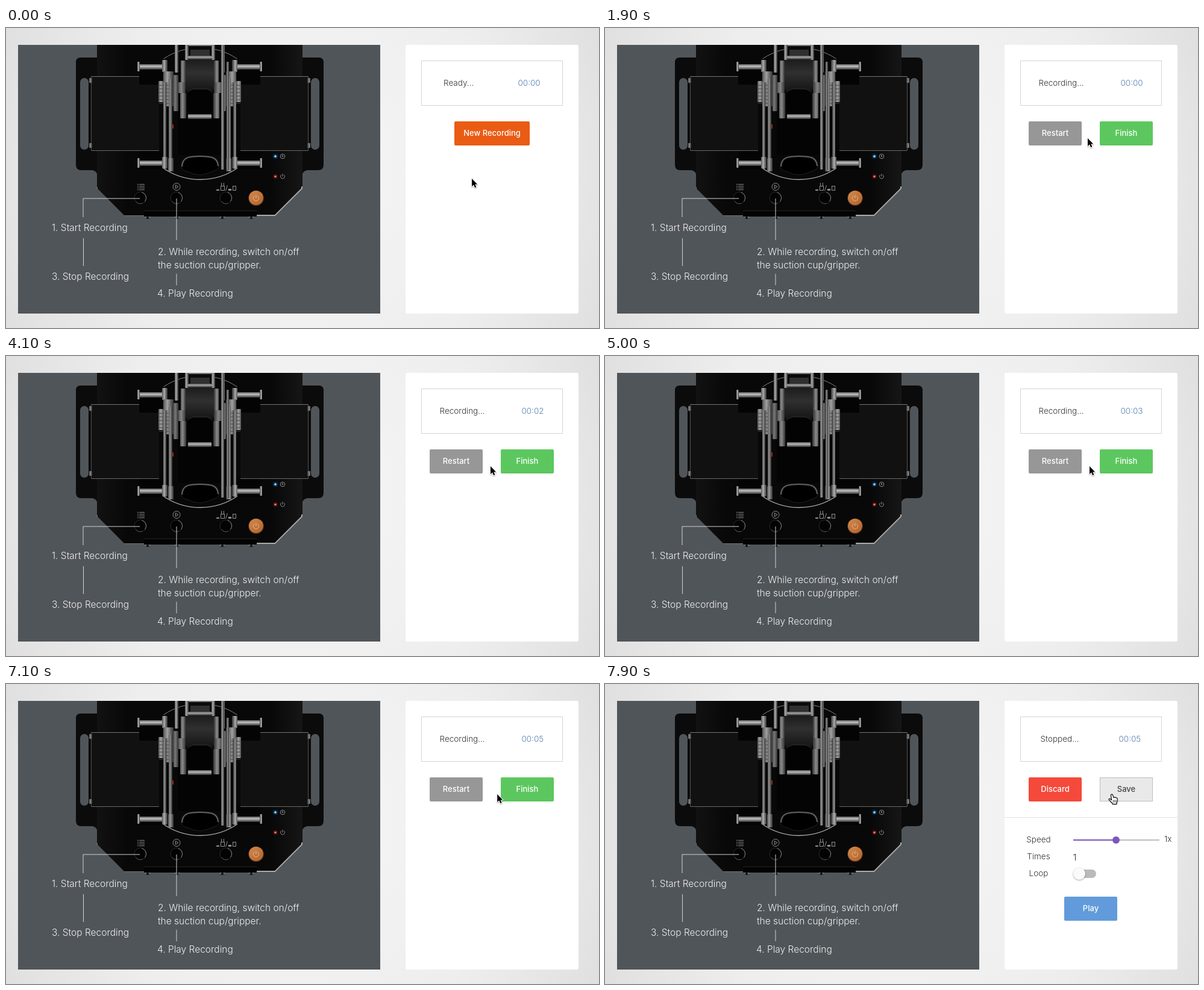
These frames come from a looping animation (984x498 px, 8 s). An HTML page with a canvas:

```html
<!DOCTYPE html>
<html lang="en">
<head>
<meta charset="utf-8">
<title>Recording panel</title>
<style>
html, body { margin: 0; width: 100%; height: 100%; overflow: hidden; background: #e9e9e9; }
canvas { display: block; }
</style>
</head>
<body>
<canvas id="stage" width="984" height="498"></canvas>
<script>
const W = 984, H = 498, LOOP = 8000;
const REC_AT = 1900, STOP_AT = 7600, COUNT_FROM = 1870;
const AXIS = 321.5;
const screen = document.getElementById('stage').getContext('2d');
const scene = document.createElement('canvas');
scene.width = W;
scene.height = H;
let c = scene.getContext('2d');

function box(color, x, y, w, h, r = 0) {
  c.fillStyle = color;
  c.beginPath();
  c.roundRect(x, y, w, h, r);
  c.fill();
}
function line(color, width, ...p) {
  c.strokeStyle = color;
  c.lineWidth = width;
  c.beginPath();
  for (let i = 0; i < p.length; i += 2) c.lineTo(p[i], p[i + 1]);
  c.stroke();
}
function disc(color, x, y, r) {
  c.fillStyle = color;
  c.beginPath();
  c.arc(x, y, r, 0, 7);
  c.fill();
}
function ring(color, width, x, y, r, a = 0, b = Math.PI * 2) {
  c.strokeStyle = color;
  c.lineWidth = width;
  c.beginPath();
  c.arc(x, y, r, a, b);
  c.stroke();
}
function shape(color, ...p) {
  c.fillStyle = color;
  c.beginPath();
  for (let i = 0; i < p.length; i += 2) c.lineTo(p[i], p[i + 1]);
  c.fill();
}
// Shaded cylinder; lies flat when wider than tall
function metal(x, y, w, h, hi = '#a8a8a8') {
  const g = w > h ? c.createLinearGradient(0, y, 0, y + h) : c.createLinearGradient(x, 0, x + w, 0);
  g.addColorStop(0, '#555');
  g.addColorStop(.4, hi);
  g.addColorStop(1, '#333');
  box(g, x, y, w, h, 1);
}
function text(s, x, y, size, color, weight = 400, align = 'left') {
  c.font = `${weight} ${size}px Inter, "Open Sans", sans-serif`;
  c.textAlign = align;
  c.fillStyle = color;
  c.fillText(s, x, y);
}
function power(color, x, y, r) {
  ring(color, 1, x, y, r, -1, Math.PI + 1);
  line(color, 1, x, y - r - 1, x, y);
}
function bothSides(draw) {
  draw();
  c.save();
  c.translate(AXIS * 2, 0);
  c.scale(-1, 1);
  draw();
  c.restore();
}

function flange() {
  c.fillStyle = '#0b0b0b';
  c.beginPath();
  c.moveTo(152, 49);
  c.lineTo(124, 49);
  c.quadraticCurveTo(116, 49, 116, 57);
  c.lineTo(116, 227);
  c.quadraticCurveTo(116, 236, 125, 236);
  c.lineTo(143, 236);
  c.quadraticCurveTo(151, 237, 152, 246);
  c.fill();
  box('#50555a', 123, 83, 14, 119, 7);
}
function plate() {
  box('#111', 141, 80, 113, 124);
  line('#77746f', 1, 254, 80.5, 141.5, 80.5);
  line('#55534f', 1, 141.5, 81, 141.5, 203);
  line('#6b6863', 1, 141.5, 203.5, 254, 203.5);
  for (const y of [87, 195]) metal(138, y - 4, 5, 8, '#888');
}
function linkage() {
  box('#040404', 221, 65, 38, 29, 2);
  box('#040404', 221, 204, 38, 30, 2);
  box('#111', 230, 94, 24, 109);
  for (const y of [64, 224]) {
    metal(220, y - 4, 46, 9, '#c2c2c2');
    metal(218, y - 8, 4, 16, '#b8b8b8');
  }
  metal(259, 53, 9, 20, '#aaa');
  metal(253, 88, 10, 35, '#a5a5a5');
  metal(261, 72, 17, 18, '#a0a0a0');
  metal(264, 90, 14, 40, '#8f8f8f');
  for (let y = 95; y < 128; y += 6) line('#444', 1, 254, y, 278, y);
  metal(278, 78, 8, 60, '#777');
  metal(286, 90, 12, 18, '#858585');
  metal(289, 108, 10, 42, '#8c8c8c');
  metal(290, 54, 8, 36, '#8c8c8c');
  metal(280, 28, 6, 46, '#aaa');
  box('#050505', 266, 130, 4, 90);
  metal(261, 90, 5, 144, '#929292');
  metal(270, 84, 6, 152, '#8b8b8b');
  metal(259, 214, 9, 19, '#b0b0b0');
  metal(269, 216, 9, 22, '#999');
}
function rightRods() {
  metal(357, 28, 5, 207, '#9a9a9a');
  metal(366, 56, 4, 180, '#858585');
}

function tower() {
  const g = c.createLinearGradient(0, 50, 0, 104);
  g.addColorStop(0, '#1a1a1a');
  g.addColorStop(.45, '#303030');
  g.addColorStop(1, '#161616');
  box('#0a0a0a', 299, 50, 45, 100, 3);
  box(g, 298, 52, 47, 52, 4);
  box('#030303', 301, 102, 41, 42, 10);
  line('#2b2b2b', 1, 300, 106, 311, 101, 333, 101, 343, 106);
  metal(302, 143, 39, 8, '#bcbcbc');
  box('#0a0a0a', 298, 28, 47, 24);
  metal(297, 28, 6, 25, '#aaa');
  metal(341, 28, 6, 25, '#aaa');
  box('#777', 303, 28, 38, 2);
  box('#303030', 306, 36, 32, 11);
  metal(301, 46, 42, 6, '#a5a5a5');
}

function handle() {
  c.fillStyle = '#000';
  c.beginPath();
  c.moveTo(291, 231);
  c.bezierCurveTo(290, 215, 302, 212, 322, 212);
  c.bezierCurveTo(342, 212, 354, 215, 353, 231);
  c.bezierCurveTo(350, 238, 342, 237, 335, 241);
  c.bezierCurveTo(326, 245, 313, 244, 306, 240);
  c.bezierCurveTo(299, 237, 293, 238, 291, 231);
  c.fill();
  c.strokeStyle = '#222';
  c.lineWidth = 1;
  c.stroke();
  c.strokeStyle = '#606060';
  c.lineWidth = 2.2;
  c.beginPath();
  c.moveTo(292, 230);
  c.bezierCurveTo(293, 215, 302, 213, 322, 213);
  c.bezierCurveTo(342, 213, 351, 215, 352, 229);
  c.stroke();
}

function icons() {
  const ink = '#8d8d8d';
  for (let y = 259.5; y < 271; y += 3) {
    box(ink, 218, y - .5, 2, 1);
    line(ink, 1, 221, y, 230, y);
  }
  ring(ink, 1, 283, 263.5, 6);
  line(ink, 1, 281.5, 260.5, 281.5, 266.5, 286, 263.5, 281.5, 260.5);
  box(ink, 349, 268, 5, 2);
  c.strokeStyle = ink;
  c.lineWidth = 1;
  c.strokeRect(356.5, 262.5, 6, 7);
  line(ink, 1, 357.5, 262, 357.5, 257);
  line(ink, 1, 361.5, 262, 361.5, 257);
  line(ink, 1, 364.5, 270, 367.5, 261);
  box(ink, 369, 267, 5, 3);
  c.strokeRect(376.5, 262.5, 5, 7);
  ring(ink, 1, 459, 213, 3.8);
  disc(ink, 459, 212.5, 1.2);
  power(ink, 459, 246.5, 3.5);
}

function led(core, glow, y) {
  const g = c.createRadialGradient(447, y, 1, 447, y, 6);
  g.addColorStop(0, glow);
  g.addColorStop(1, 'rgba(0,0,0,0)');
  c.fillStyle = g;
  c.fillRect(441, y - 6, 12, 12);
  disc(core, 447, y, 1.6);
}

function controls() {
  for (const x of [223, 283, 365]) {
    disc('#030303', x, 282, 11);
    ring('#2d2d2d', 1, x, 282, 10);
    ring('#858585', 1, x, 282, 9.5, -1.3, .7);
    ring('#555', 1, x, 282, 9.5, 1.2, 2.5);
  }
  disc('#40200f', 415, 282.5, 13);
  const g = c.createLinearGradient(405, 272, 424, 293);
  g.addColorStop(0, '#d08649');
  g.addColorStop(1, '#b3652f');
  disc(g, 415, 282, 12);
  power('#e5b894', 415, 282.5, 4.5);
  led('#aee2ff', '#1682d9', 213);
  led('#ff8371', '#a62018', 246.5);
}

function device() {
  c.save();
  c.beginPath();
  c.rect(20, 28, 601, 446);
  c.clip();
  bothSides(flange);
  const body = c.createLinearGradient(150, 0, 492, 0);
  body.addColorStop(0, '#121212');
  body.addColorStop(.15, '#080808');
  body.addColorStop(.85, '#080808');
  body.addColorStop(1, '#161616');
  shape(body, 151, 20, 492, 20, 492, 267, 447, 312, 196, 312, 151, 267);
  line('#777', 1, 151.5, 264, 151.5, 267, 196, 311.5, 230, 311.5);
  line('#aaa', 2, 415, 311, 446.5, 311, 491, 266.5, 491, 263);
  for (const x of [235, 284, 359, 407]) {
    metal(x - 5, 312, 10, 5, '#777');
    disc('#111', x, 315, 2);
  }
  box('#020202', 229, 304, 187, 9);
  line('#222', 1, 229, 303.5, 416, 303.5);
  bothSides(plate);
  ring('#858585', 1, AXIS + 1, 142, 109.5, -2.16, -.98);
  ring('#aaa', 1.3, AXIS + 1, 142, 109.5, .95, 2.19);
  box('#040404', 285, 95, 73, 116);
  tower();
  bothSides(linkage);
  rightRods();
  box('#9c211a', 276, 160, 2, 7);
  handle();
  icons();
  controls();
  c.restore();
}

function notes() {
  const ink = '#d2d3d4';
  line(ink, 1, 222, 283, 128, 283, 128, 314);
  line(ink, 1, 128.5, 349, 128.5, 395);
  line(ink, 1, 283, 283, 283, 352);
  line(ink, 1, 283, 408, 283, 427);
  const note = (s, x, y) => text(s, x, y, 15.5, '#f0f0f0', 300);
  note('1. Start Recording', 76, 336.5);
  note('3. Stop Recording', 76, 418);
  note('2. While recording, switch on/off', 252, 377);
  note('the suction cup/gripper.', 252, 399);
  note('4. Play Recording', 251, 445.5);
}

function buildScene() {
  const g = c.createRadialGradient(492, 230, 80, 492, 249, 570);
  g.addColorStop(0, '#f4f4f4');
  g.addColorStop(.55, '#eee');
  g.addColorStop(1, '#dedede');
  box(g, 0, 0, W, H);
  box('#505559', 20, 28, 601, 446);
  device();
  notes();
  box('#fff', 663, 28, 287, 446, 3);
  c.strokeStyle = '#d5d5d5';
  c.lineWidth = 1;
  c.strokeRect(689.5, 54.5, 234, 74);
}

const clamp = v => Math.max(0, Math.min(1, v));
const ease = v => v * v * (3 - 2 * v);
const path = [
  [0, 773, 250], [150, 773, 250], [900, 799, 190], [1100, 799, 190], [1750, 801, 183],
  [2300, 801, 183], [2900, 804, 183], [6900, 804, 183], [7450, 841, 183], [LOOP, 841, 183]
];
function pointer(t) {
  const i = path.findIndex((p, n) => n && t <= p[0]);
  const [a, ax, ay] = path[i - 1], [b, bx, by] = path[i];
  const k = ease((t - a) / (b - a));
  return [ax + (bx - ax) * k, ay + (by - ay) * k];
}
function mix(a, b, k) {
  return `rgb(${a.map((v, i) => Math.round(v + (b[i] - v) * k))})`;
}

function button(label, color, x, y, w = 88, ink = '#fff') {
  box(color, x, y, w, 40, 2);
  text(label, x + w / 2, y + 24, 13, ink, 500, 'center');
}
function status(label, x, time, tx) {
  text(label, x, 95.5, 13.5, '#333', 300);
  text(time, tx, 95.5, 13.5, '#5480ad', 300);
}

function settings() {
  line('#e3e3e3', 1, 663, 221.5, 950, 221.5);
  const label = (s, y) => text(s, 719.5, y, 13.5, '#333', 300, 'center');
  label('Speed', 263);
  label('Times', 291);
  label('Loop', 319);
  box('#bdbdbd', 848, 258, 72, 2);
  box('#7b57bd', 777, 258, 71, 2);
  disc('#7b57bd', 848, 259, 6);
  text('1x', 928, 262, 13.5, '#333', 300);
  text('1', 776.5, 292.5, 15, '#333', 300);
  box('#bababa', 780, 308, 35, 14, 7);
  c.save();
  c.shadowColor = 'rgba(0,0,0,.35)';
  c.shadowBlur = 3;
  c.shadowOffsetY = 1;
  disc('#fafafa', 787, 315, 10);
  c.restore();
  button('Play', '#629bdb', 762, 353);
}

const arrow = new Path2D('M0 0V13L3 10.3L5.2 15L7.4 14L5.3 9.4H9.2Z');
const hand = new Path2D('M-1.6 1.4Q-.4-.8 1.3 .8L3 5.6Q4.3 4.3 5.4 5.6Q6.6 4.6 7.5 6.1Q9 5.6 9.2 7.4V10.6Q9 13 8 14.2V16.4H1.2L.8 14.6Q-1.2 13.4-2.4 11.4L-4.9 8.8Q-4.9 6.9-2.8 7.7L-.4 9.4Z');
function cursor(x, y, pressing) {
  c.save();
  c.translate(x, y);
  c.lineJoin = 'round';
  c.shadowColor = 'rgba(0,0,0,.35)';
  c.shadowBlur = 2;
  c.shadowOffsetY = 1;
  if (pressing) {
    c.fillStyle = '#fff';
    c.fill(hand);
    c.shadowColor = 'transparent';
    c.strokeStyle = '#111';
    c.lineWidth = 1.2;
    c.stroke(hand);
    for (const lx of [2.4, 4.6, 6.8]) line('#222', .9, lx, 9.5, lx, 13.5);
  } else {
    c.strokeStyle = '#fff';
    c.lineWidth = 2;
    c.stroke(arrow);
    c.shadowColor = 'transparent';
    c.fillStyle = '#000';
    c.fill(arrow);
  }
  c.restore();
}

function draw(t) {
  c.drawImage(scene, 0, 0);
  const [x, y] = pointer(t);
  const secs = Math.max(0, Math.min(5, Math.floor((t - COUNT_FROM) / 1000)));
  let over;
  if (t < REC_AT) {
    over = y < 195;
    status('Ready...', 726, '00:00', 849.5);
    const k = clamp((t - 700) / 200);
    button('New Recording', mix([234, 91, 20], [239, 145, 99], k), 744, 155, 125);
  } else if (t < STOP_AT) {
    over = x >= 821;
    status('Recording...', 719.5, '00:0' + secs, 855.5);
    button('Restart', '#979797', 703, 155);
    const k = clamp((t - 7180) / 200);
    button('Finish', mix([92, 199, 95], [143, 217, 145], k), 821, 155);
  } else {
    over = true;
    status('Stopped...', 722.5, '00:05', 852.5);
    button('Discard', '#f4493b', 703, 155);
    button('Save', '#e9e9e9', 821, 155, 88, '#444');
    c.strokeStyle = '#bdbdbd';
    c.lineWidth = 1;
    c.strokeRect(821.5, 155.5, 87, 39);
    settings();
  }
  cursor(x, y, over);
}

buildScene();
c = screen;
const began = performance.now();
function tick() {
  draw((performance.now() - began) % LOOP);
  requestAnimationFrame(tick);
}
tick();
</script>
</body>
</html>
```
